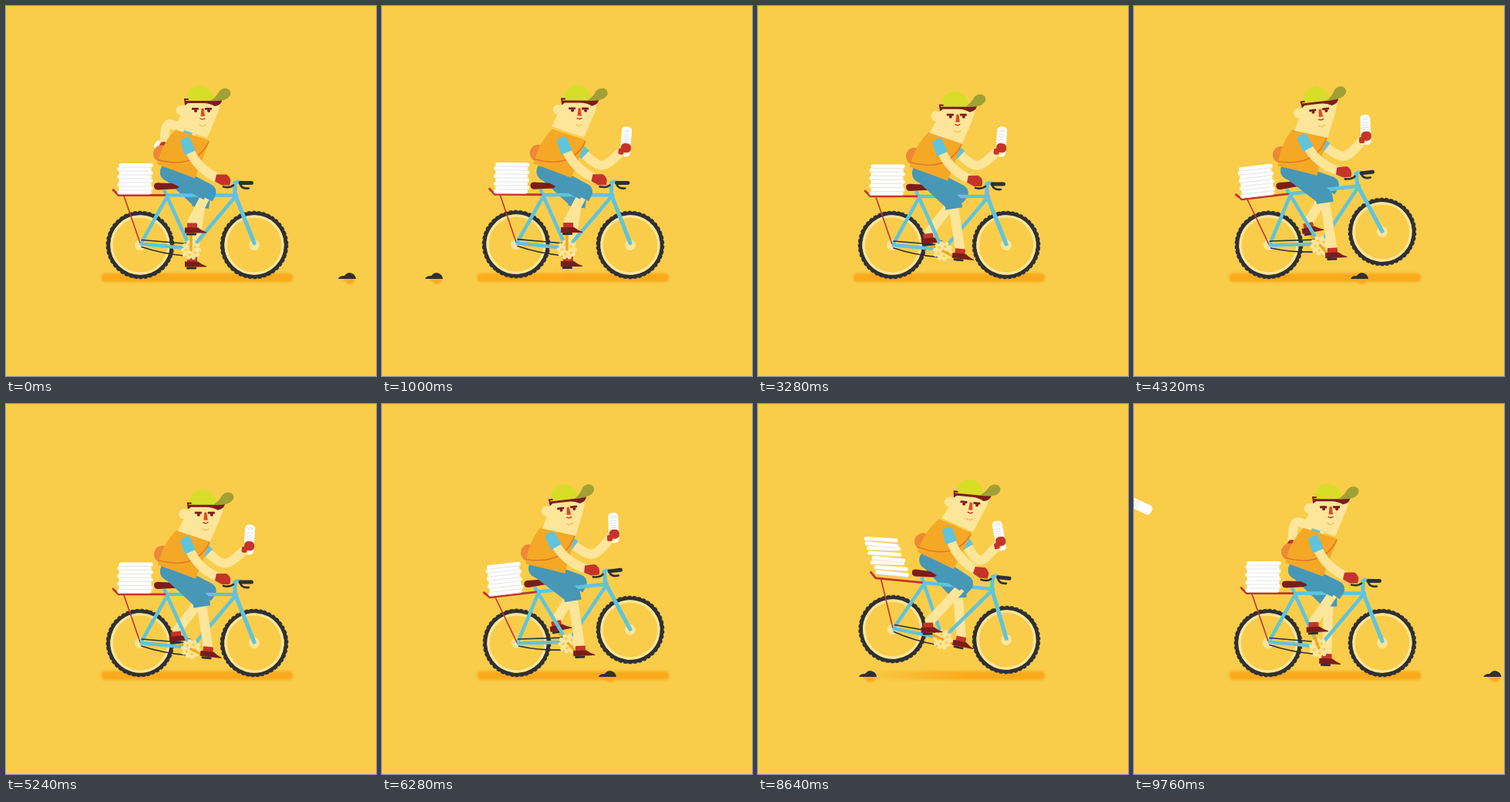
Write an HTML page with a canvas that moves like this. It is 480 by 480 pixels and loops after 9.8 s.

```html
<!DOCTYPE html>
<html lang="en">
<head>
<meta charset="utf-8">
<title>Paper round</title>
<style>
html, body { margin: 0; width: 100%; height: 100%; overflow: hidden; background: #f9cd4a; }
canvas { display: block; width: 480px; height: 480px; }
</style>
</head>
<body>
<canvas id="stage"></canvas>
<script>
const canvas = document.getElementById('stage');
const scale = window.devicePixelRatio || 1;
canvas.width = canvas.height = 480 * scale;
const ctx = canvas.getContext('2d');

const C = {
  bg: '#f9cd4a', dark: '#2f3033', skin: '#fde59a', blue: '#5fc4dc', shorts: '#4797b7',
  red: '#c5342a', maroon: '#7c1d1b', vest: '#f4a826', bag: '#ee8836', strap: '#e0702c',
  lime: '#d8dd27', olive: '#a0a034', shade: '#f9aa1c', crank: '#efa722', white: '#fff', grey: '#dedede'
};
const STEP = 40, CYCLE = 49, TURN = 50, RELEASE = 39;

const rad = deg => deg * Math.PI / 180;
const mix = (a, b, k) => a + (b - a) * k;
const ease = x => {
  const k = Math.min(1, Math.max(0, x));
  return k * k * (3 - 2 * k);
};
const hop = (n, start, len, h) =>
  n > start && n < start + len ? h * Math.sin(Math.PI * (n - start) / len) : 0;

function fill(color, d) {
  ctx.fillStyle = color;
  ctx.fill(new Path2D(d));
}
function stroke(color, width, d, cap = 'round') {
  ctx.strokeStyle = color;
  ctx.lineWidth = width;
  ctx.lineCap = cap;
  ctx.lineJoin = 'round';
  ctx.stroke(new Path2D(d));
}
function dot(color, x, y, r) {
  ctx.fillStyle = color;
  ctx.beginPath();
  ctx.arc(x, y, r, 0, 7);
  ctx.fill();
}
function ring(color, r, width) {
  ctx.strokeStyle = color;
  ctx.lineWidth = width;
  ctx.beginPath();
  ctx.arc(0, 0, r, 0, 2 * Math.PI);
  ctx.stroke();
}
function bar(color, x, y, w, h, r) {
  ctx.fillStyle = color;
  ctx.beginPath();
  ctx.roundRect(x, y, w, h, r);
  ctx.fill();
}
function at(x, y, angle, draw) {
  ctx.save();
  ctx.translate(x, y);
  ctx.rotate(angle);
  draw();
  ctx.restore();
}
function blurred(px, draw) {
  ctx.save();
  ctx.filter = `blur(${px * scale}px)`;
  draw();
  ctx.restore();
}

function shadow(rear) {
  const g = ctx.createLinearGradient(130, 0, 270, 0);
  g.addColorStop(0, `rgba(249,170,28,${1 - Math.min(1, rear / 17)})`);
  g.addColorStop(1, C.shade);
  blurred(1.6, () => bar(g, 123.5, 346.5, 249, 11.5, 5.5));
}

function stone(x) {
  at(x, 354, 0, () => {
    blurred(1, () => fill(C.shade, 'M-6 0H11Q8 8 2 7Z'));
    fill(C.dark, 'M-11 0Q-10 -4 -3 -4Q0 -8 4 -8Q11 -7 12 0Z');
  });
}

function wheel(x, spin) {
  at(x, 310, spin, () => {
    ctx.lineCap = 'butt';
    ring(C.dark, 41, 5);
    ctx.setLineDash([4, 2.5]);
    ring(C.dark, 43.3, 2);
    ctx.setLineDash([]);
    ring(C.skin, 37, 3.4);
    dot(C.skin, 0, 0, 7);
  });
}

function paper(x, y, angle) {
  at(x, y, angle, () => {
    bar(C.white, -6.5, -19.5, 13, 39, 5);
    stroke(C.grey, 1, 'M-3.5 -15Q0 -11 3.5 -15M-1 -16Q1 -17 2 -15M-4 -9H4M-4 -6H3M-4 -3H4M-4 0H3');
  });
}

// The hand sweeps over the shoulder: low to fetch a paper, high to throw it.
function backArm(n, jolt) {
  const thrown = ease((n - 34) / 11);
  const k = n < 30 ? ease(n / 9) : 1 - thrown;
  const sweep = Math.PI * (1 + k);
  const reach = 54 + (n < 30 ? -17 : 36) * Math.sin(Math.PI * k);
  const hx = 259 + reach * Math.cos(sweep) - 12 * jolt;
  const hy = 186 + reach * Math.sin(sweep);
  const sx = mix(240, 255, k), sy = mix(168, 186, k);

  // elbow of two equal bones
  const dx = hx - sx, dy = hy - sy, d = Math.hypot(dx, dy);
  const bend = Math.sqrt(Math.max(40, 1600 - d * d / 4)) / d;
  const ex = (sx + hx) / 2 - dy * bend, ey = (sy + hy) / 2 + dx * bend;

  const tilt = rad(mix(-60, 4, k) - 20 * jolt);
  const grip = mix(-4, 10, k);
  if (n < RELEASE) paper(hx + 2 + grip * Math.sin(tilt), hy - grip * Math.cos(tilt), tilt);
  stroke(C.skin, 12, `M${sx} ${sy}C${ex} ${ey} ${ex} ${ey} ${hx} ${hy}`);
  const cuff = 11 / Math.hypot(ex - sx, ey - sy);
  stroke(C.blue, 15, `M${sx} ${sy}l${(ex - sx) * cuff} ${(ey - sy) * cuff}`, 'butt');
  at(hx, hy, tilt, () => {
    bar(C.red, -4, -8, 13, 12, 5);
    bar(C.red, -7, -1, 7, 8, 2);
  });
}

function leg(a) {
  const px = 240 + 22 * Math.sin(a), py = 318 - 22 * Math.cos(a);
  const lift = rad(35 - 9 * Math.cos(a + .6));
  const kx = 212 + 56 * Math.cos(lift), ky = 217 + 56 * Math.sin(lift);
  const ax = px + 2, ay = py - 15;
  const hem = 8 / Math.hypot(ax - kx, ay - ky);
  stroke(C.skin, 12.5, `M${kx} ${ky}L${ax} ${ay}`);
  stroke(C.shorts, 22, `M212 217L${kx} ${ky}l${(ax - kx) * hem} ${(ay - ky) * hem}`, 'butt');
  dot(C.shorts, 212, 217, 12);
  at(px, py, rad(7 * Math.sin(a)), () => {
    bar(C.dark, -6, 0, 13, 3, 1);
    bar(C.red, -5, -13, 13, 8, 1);
    fill(C.maroon, 'M-8 0V-7H9Q14 -3 20 -1V0Z');
  });
}

function crank(a) {
  stroke(C.crank, 3.5, `M240 318l${22 * Math.sin(a)} ${-22 * Math.cos(a)}`);
}

function gear(a) {
  stroke(C.dark, 1.6, 'M176 305L236 310M176 314Q202 323 236 326');
  at(240, 318, a, () => {
    dot(C.skin, 0, 0, 10.5);
    for (let i = 0; i < 10; i++) {
      const k = i * Math.PI / 5;
      dot(C.skin, 10.5 * Math.cos(k), 10.5 * Math.sin(k), 2.6);
      if (i % 2) dot(C.bg, 6.5 * Math.cos(k), 6.5 * Math.sin(k), 1.8);
    }
  });
}

function frame() {
  stroke(C.red, 1.6, 'M153 248L174 309');
  stroke(C.blue, 4.6, 'M210 247L176 308M174 310L238 316M205 240L239 315M207 247H299L245 311', 'butt');
  stroke(C.blue, 5.2, 'M297 231V246L322 309');
  stroke(C.blue, 4, 'M297 232Q298 228 304 230');
  stroke(C.red, 2.8, 'M139 240L146 247H206');
  fill(C.maroon, 'M192 235Q192 230 200 231L224 232Q227 239 216 239L198 240Q192 240 192 235Z');
}

function handlebar() {
  stroke(C.dark, 5, 'M304 231H318.5');
  stroke(C.dark, 2.6, 'M282 236Q291 238 295 234M304 233Q306 239 315 238');
}

function stack(jolt) {
  for (let i = 0; i < 8; i++) {
    const x = 145 + (i % 2 ? 1.5 : -.5) - jolt * (2.8 * i + i % 3);
    const y = 240.5 - 5 * i - jolt * (4 + i);
    at(x, y, -.03 * jolt * (i % 3), () => {
      bar(C.white, 0, 0, 44, 5.3, 2.6);
      stroke(C.grey, .8, 'M3 5H41');
    });
  }
}

function torso() {
  dot(C.bag, 203, 195, 11);
  fill(C.vest, 'M221 164L265 178L246 227Q220 217 197 209Q203 182 221 164Z');
  stroke(C.strap, 1.3, 'M198 203Q246 216 264 180');
}

function frontArm() {
  stroke(C.skin, 12, 'M238 188Q248 212 273 224');
  fill(C.blue, 'M226 177Q231 171 238 172L246 189L232 195Z');
  fill(C.red, 'M273 220L286 220Q294 225 290 234H280L271 229Z');
}

function head() {
  dot(C.skin, 231, 143, 6.5);
  fill(C.skin, 'M236 132H283L279 146L265 179L223 165L234 143Z');
  fill(C.maroon, 'M235 128H284Q285 136 275 138Q268 134 260 134H240L236 137Z');
  fill(C.lime, 'M237 131Q239 112 256 111Q272 113 274 131Z');
  fill(C.olive, 'M269 131Q276 127 281 118Q288 112 294 117Q298 123 291 128Q284 132 269 131Z');
  stroke(C.maroon, 2, 'M236 129H240');
  for (const x of [245, 262]) {
    bar(C.maroon, x, 140, 9, 2.8, .5);
    dot(C.maroon, x + 5, 144, 2);
  }
  fill('#df4a28', 'M257.5 141H260.5L262 151H256.5Z');
  stroke(C.red, 1.5, 'M256 154Q259 156 262 154');
  stroke('#f2bd4c', 1.2, 'M255 162Q258 166 263 162');
}

function draw(ms) {
  const p = Math.floor(ms / STEP) % CYCLE;
  // the last part of the ride runs slightly faster
  const n = p + Math.max(0, p - 30) / 36;
  const pedal = n * 4 * Math.PI / TURN;
  const spin = n * 15 / 44;
  const front = hop(n, 6, 8, 17) + hop(n, 17, 6, 4);
  const rear = hop(n, 15.5, 9, 18) + hop(n, 24.5, 5, 3);
  const jolt = hop(n, 15.5, 9, 1);
  const bob = (Math.cos(pedal) + .5) / 1.5;

  ctx.setTransform(scale, 0, 0, scale, 0, 0);
  ctx.fillStyle = C.bg;
  ctx.fillRect(0, 0, 480, 480);
  shadow(rear);
  stone(442 - 15 * (n < 40 ? n : n - TURN));
  if (n >= RELEASE) {
    const left = 48.5 - n;
    paper(5 + 28 * left, 68 + 63 * (1 - left / 6) ** 2, rad(40 * left - 65));
  }

  at(322, 310 - front, Math.atan2(rear - front, 148), () => {
    ctx.translate(-322, -310);
    backArm(n, jolt);
    wheel(174, spin);
    wheel(322, spin);
    ctx.translate(0, -1.5 * bob);
    crank(pedal + Math.PI);
    leg(pedal + Math.PI);
    frame();
    stack(jolt);
    gear(pedal);
    crank(pedal);
    leg(pedal);
    handlebar();
    at(-bob, -2 * bob, 0, torso);
    at(3 * jolt - 4 * bob, -6.5 * bob, 0, head);
    frontArm();
  });
}

const start = performance.now();
function tick() {
  draw(performance.now() - start);
  requestAnimationFrame(tick);
}
draw(0);
requestAnimationFrame(tick);
</script>
</body>
</html>
```
